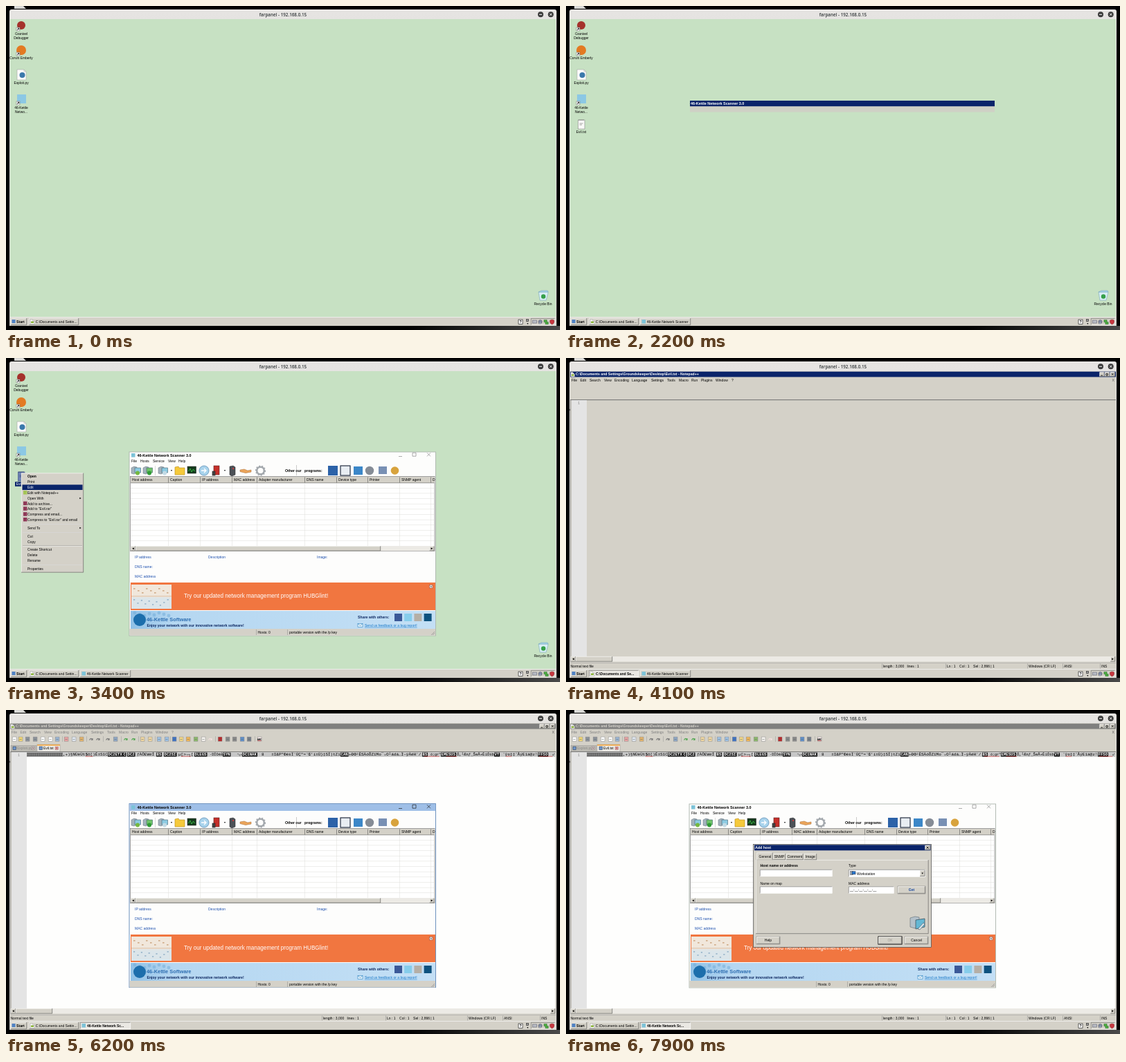
An HTML page that plays this animation: 800 px wide and 469 px high, repeating every 8 s.

```html
<!DOCTYPE html>
<html lang="en">
<head>
<meta charset="utf-8">
<title>Remote desktop session</title>
<style>
html, body { margin: 0; width: 100%; height: 100%; overflow: hidden; background: #000; }
svg { display: block; width: 100vw; height: 100vh; }
text { font-family: "Liberation Sans", Arial, sans-serif; white-space: pre; }
.mono { font-family: "Liberation Mono", "DejaVu Sans Mono", monospace; }
.head { font-family: "Open Sans", "Noto Sans", sans-serif; }
</style>
</head>
<body>
<svg id="stage" viewBox="0 0 800 469" preserveAspectRatio="none"></svg>
<script>
const LOOP = 8000;
const FACE = '#d4d1c8', NAVY = '#0a246a', DESK = '#c7e1c3', LINK = '#1c4fae';
const APP = '46-Kettle Network Scanner';
const FILE = 'C:\\Documents and Settings\\Groundskeeper\\Desktop\\Evil.txt';

// Drawing helpers: each returns an SVG string.
const esc = s => s.replace(/&/g, '&amp;').replace(/</g, '&lt;');
const rect = (x, y, w, h, fill, more = '') =>
  `<rect x="${x}" y="${y}" width="${w}" height="${h}" fill="${fill}" ${more}/>`;
const box = (x, y, w, h, fill, line, sw = 0.6) =>
  rect(x, y, w, h, fill, `stroke="${line}" stroke-width="${sw}"`);
const disc = (x, y, r, fill, more = '') => `<circle cx="${x}" cy="${y}" r="${r}" fill="${fill}" ${more}/>`;
const path = (d, stroke, sw = 0.6, fill = 'none', more = '') =>
  `<path d="${d}" fill="${fill}" stroke="${stroke}" stroke-width="${sw}" ${more}/>`;
const text = (x, y, s, { size = 5, fill = '#000', bold, mid, cls = '', more = '' } = {}) =>
  `<text x="${x}" y="${y}" font-size="${size}" fill="${fill}" class="${cls}"` +
  `${bold ? ' font-weight="700"' : ''}${mid ? ' text-anchor="middle"' : ''} ${more}>${esc(s)}</text>`;
const each = (list, fn) => list.map(fn).join('');
const range = n => [...Array(n).keys()];

function bevel(x, y, w, h, fill = FACE, sunken = false) {
  const [a, b] = sunken ? ['#666', '#fff'] : ['#fff', '#555'];
  return rect(x, y, w, h, fill) +
    path(`M${x + .3} ${y + h}V${y + .3}H${x + w}`, a) +
    path(`M${x} ${y + h - .3}H${x + w - .3}V${y}`, b);
}
const tri = (x, y, dx, dy) =>
  `<path d="M${x + dx} ${y + dy}L${x - dx + dy} ${y - dy + dx}L${x - dx - dy} ${y - dy - dx}z"/>`;

function scrollBar(x, y, w, h, thumb) {
  return rect(x, y, w, h, '#eceae5') +
    bevel(x, y, 7, h) + tri(x + 3.5, y + h / 2, -1.4, 0) +
    bevel(x + 7, y, thumb, h) +
    bevel(x + w - 7, y, 7, h) + tri(x + w - 3.5, y + h / 2, 1.4, 0);
}

function captionButtons(x, y) {
  return each(range(3), i => bevel(x + i * 7.6, y, 7, 6.4)) +
    path(`M${x + 1.6} ${y + 4.8}h3M${x + 9.3} ${y + 2.3}h2.6v2.4h-2.6zM${x + 17.2} ${y + 1.6}l3 3m0-3l-3 3`, '#000', .8);
}

// Desktop
const shortcut = (x, y) => box(x, y, 5, 5, '#fff', '#555', .4) +
  path(`M${x + 1} ${y + 4}L${x + 3.6} ${y + 1.4}M${x + 1.6} ${y + 1.2}h2.2v2.2`, '#000', .8);
const label = (x, y, ...lines) => each(lines, (s, i) => text(x, y + i * 6, s, { mid: true, size: 4.9 }));

function page(x, y, w, h) {
  return path(`M${x} ${y}h${w - 3}l3 3v${h - 3}h${-w}z`, '#999', .5, '#fcfcfa') +
    path(`M${x + w - 3} ${y}v3h3`, '#999', .5);
}

function desktop(s) {
  let out = rect(6, 19, 788, 432, DESK) +
    disc(22, 28, 6, '#a5322c') + shortcut(15, 31) + label(22, 42, 'Granivel', 'Debugger') +
    disc(22, 64, 7, '#e37a22') + shortcut(15, 67) + label(22, 77.4, 'Corvin Emberly') +
    page(16, 92, 13, 15) + disc(23.5, 100, 4, '#3b78ab') + label(22, 113, 'Exploit.py') +
    rect(16, 128, 13, 13, '#8cc8e4') + shortcut(15, 138) + label(22, 148.6, '46-Kettle', 'Netwo...') +
    path('M769 414l2 12h9l3-12z', '#7aa9bd', .6, '#d9eef4') +
    path('M769 414l4-2h9l1 2z', '#7aa9bd', .6, '#a8d7ea') + disc(776, 420.5, 3.2, '#35a04a') +
    label(775.5, 433.2, 'Recycle Bin');
  if (s.evil) {
    out += box(17.5, 165, 9.5, 13, s.sel ? '#6f83b5' : '#fafaf8', s.sel ? '#34487d' : '#888') +
      path('M19 164v2m2-2v2m2-2v2m2-2v2M19.5 170h5m-5 2h3.5', s.sel ? '#26386b' : '#666', .6);
    out += s.sel
      ? rect(13, 179.2, 18, 6.6, NAVY) + text(22, 184, 'Evil.txt', { mid: true, fill: '#fff' })
      : label(22, 184, 'Evil.txt');
  }
  return out;
}

function taskButton(x, w, on, icon, name, short) {
  return bevel(x, 452, w, 10, on ? '#eae8e3' : FACE, on) + icon +
    text(x + (on ? 10 : 9.8), 458.8, on ? short : name, { bold: on, size: on ? 4.95 : 5 });
}

function taskbar(s) {
  const top = s.active === 'dialog' ? 'scanner' : s.active;
  let out = rect(6, 450, 788, 13, FACE) + rect(6, 450.4, 788, .6, '#fff') +
    bevel(7, 452, 23, 10) + rect(8.5, 454, 5, 5, '#4f82c4') + text(15, 458.9, 'Start', { bold: true, size: 5.2 }) +
    taskButton(33, 72, top === 'editor', page(35, 453.5, 6, 7) + rect(36, 456.5, 4, 2.5, '#8db63c'),
      'C:\\Documents and Settin...', 'C:\\Documents and Se...');
  if (s.task) out += taskButton(107, 73, top === 'scanner', rect(109.5, 454, 5.5, 5.5, '#7cc3d8'),
    APP, '46-Kettle Network Sc...');
  return out + bevel(758, 452, 35, 10, FACE, true) +
    box(740, 454, 6, 6.5, '#fff', '#000') + text(743, 459.4, '?', { mid: true, bold: true }) +
    box(751.6, 453.5, 3, 3, '#999', '#222') + tri(753.3, 460, 0, 1) +
    box(760.5, 455, 6, 4, '#b8bcc4', '#667') + disc(771.5, 457, 2.6, '#8490a8', 'stroke="#445" stroke-width=".5"') +
    box(769.8, 458, 3, 2, '#b6c3d6', '#556', .4) +
    box(777, 454.5, 4, 3.2, '#55bb48', '#276c25') + box(779, 457.5, 4, 3.2, '#55bb48', '#276c25') +
    path('M785.5 455l3-1 3 1v3q-1 2-3 3-2-1-3-3z', '#8c1f25', .5, '#c73740');
}

// Text editor
const MENU = [[8, 'File'], [20.5, 'Edit'], [34, 'Search'], [55, 'View'], [70, 'Encoding'], [95, 'Language'],
  [123, 'Settings'], [146, 'Tools'], [163, 'Macro'], [181, 'Run'], [195, 'Plugins'], [216, 'Window'], [239, '?']];
const TOOLS = [12, 21, 31, 42, 53, 64, 74, 87, 98, 109, 123, 133, 147, 158, 173, 184, 197, 208, 221, 232,
  243, 253, 263, 274, 285, 295, 309, 320, 330, 341, 351, 366];
const TINTS = '#fff #f1d572 #8d939b #8d939b #fff #fff #9ab5d4 #e8a2a2 #dfe6ef #e3b36b #777 #777 #777 #8fa7c4 #4ba54b #4ba54b #f0d6a0 #f0d6a0 #9ec1e4 #9ec1e4 #3f73c4 #f3d784 #f1b657 #8cb86a #f5f2ee #f5e0e0 #b92727 #888 #888 #5f8fc9 #777f8a #f4e8e8'.split(' ');
const THIN = new Set([10, 11, 12, 14, 15, 25]);

// Control-code tags sit at fixed places; plain runs fill the gaps.
const RUNS = [[82, ',+)§NÙèÙt$ô[)É±S1C'], [189, 'ƒÀÕEWéÍ'], [249, 'µ[>→┐['], [294, '·DÎOéå'], [334, '"çT'],
  [369, '8   ±I&P"ΦéśÏ¨ÚÇ"=¨Œ\'í±Ù}‡SÎ)tZï'], [495, '+ÐΦ²ÈSÀóÔZîMo¯›O¹ádá…Ï–ÿÀéH¨/'], [613, 'ó;gr"'],
  [651, 'Ó,¹Ænƒ_ŠeÅ+ÈíÓśb'], [717, '¨ŷ¤‡‡¨ÅýEîá@z!'], [789, 'ä"']];
const TAGS = [[147, 'DC2ETX'], [169, 'C'], [175, 'DC2'], [217, 'BS'], [228, 'DC2SI'], [272, 'DLEGS'], [313, 'SYN'],
  [341, 'DC1NAK'], [483, 'CAN'], [601, 'BS'], [628, 'EMESUS'], [705, 'VT'], [768, 'FFSO']];

function firstLine() {
  return rect(30, 61.2, 763, 6.6, '#c6c6c6') + rect(30, 61.8, 52, 5.4, '#555') +
    path('M30 64.5H82', '#999', 4, 'none', 'stroke-dasharray=".7 .9"') +
    each(RUNS, ([x, s]) => {
      const end = TAGS.map(t => t[0]).find(v => v > x) || 793;
      return text(x, 66.4, s, { cls: 'mono', size: Math.min(6, (end - x) / s.length / .6) });
    }) +
    each(TAGS, ([x, s]) => rect(x, 61.6, s.length * 3.5 + 1, 5.8, '#111') +
      text(x + .6, 66.2, s, { cls: 'mono', size: 5.6, fill: '#fff', bold: true })) +
    path('M115 67.2h10M253 67.2h14M604 67.2h22M636 67.2h15M722 67.2h8M770 67.2h19', '#d22', .8, 'none',
      'stroke-dasharray="1.2 .6"');
}

function tab(x, w, name, on) {
  return rect(x, on ? 50 : 51.5, w, on ? 10 : 8.5, on ? '#eeece7' : '#bdbbb4', 'stroke="#888" stroke-width=".4"') +
    (on ? rect(x, 50, w, 1.6, '#f2a33c') : '') + box(x + 3, 53, 4.5, 4.5, '#6f95c9', '#345') +
    text(x + 9, 57, name, { fill: on ? '#000' : '#8a8a86' }) +
    box(x + w - 7, 53, 4.6, 4.6, on ? '#e9a0a0' : '#ccc', '#866', .4) +
    path(`M${x + w - 5.8} 54.2l2.2 2.2m0-2.2l-2.2 2.2`, '#622', .5);
}

function editorTools() {
  return each(TOOLS, (x, i) => THIN.has(i)
    ? path(`M${x - 2.5} 43.5q2-4 4.5-.5m0-2v2.3h-2.2`, TINTS[i], 1.1)
    : box(x - 2.8, 39, 5.8, 6.2, TINTS[i], '#8a8a8a', .5) + path(`M${x - 1.5} 42.5h3`, '#566', .5)) +
    each([81, 116, 140, 166, 191, 215, 237, 302, 359], x => rect(x, 38, .5, 8, '#999')) +
    text(366, 43.6, 'ABC', { size: 3, bold: true, mid: true }) + path('M363.5 44.4h5', '#d22', .6);
}

function editor(s) {
  const on = s.active === 'editor', ink = on ? '#000' : '#808080';
  const status = [[458, 'length : 3,000   lines : 1'], [550, 'Ln : 1    Col : 1    Sel : 2,866 | 1'],
    [668, 'Windows (CR LF)'], [719, 'ANSI'], [773, 'INS']];
  return rect(6, 19, 788, 432, FACE) + rect(6, 19.7, 788, 7.8, on ? NAVY : '#7f7f7f') +
    page(7, 20.5, 5.5, 6.4) + rect(8, 23.5, 3.5, 2.4, '#8db63c') +
    text(14, 25.4, FILE + ' - Notepad++', { bold: true, size: 5.15, fill: on ? '#fff' : '#d6d3cc' }) +
    captionButtons(770.5, 20.4) +
    each(MENU, ([x, m]) => text(x, 34.2, m, { fill: ink })) + text(788.5, 34.2, 'X', { fill: '#555' }) +
    rect(6, 60.2, 788, .9, '#666') + rect(8, 61, 22, 371, '#e4e4e4') + rect(6.4, 61, .7, 379, '#777') +
    (s.editor === 'full'
      ? rect(30, 61, 763, 371, '#fefefd') + editorTools() +
        tab(7, 37, 'Exploit.py', false) + tab(45, 33, 'Evil.txt', true) + firstLine()
      : '') +
    text(17, 66.5, '1', { fill: '#888', cls: 'mono' }) +
    scrollBar(7, 432, 786, 7.5, 53) +
    rect(6, 441, 788, 9.4, FACE) + rect(6, 441, 788, .5, '#999') + text(6.5, 447.8, 'Normal text file') +
    each(status, ([x, v]) => rect(x - 2, 442.5, .5, 7, '#888') + text(x, 447.8, v));
}

// Scanner
const COLS = [[182, 'Host address'], [237, 'Caption'], [283, 'IP address'], [329, 'MAC address'],
  [365, 'Adapter manufacturer'], [434, 'DNS name'], [480, 'Device type'], [525, 'Printer'], [571, 'SNMP agent'], [616, 'D']];

const pc = (x, y, tint, mark) => path(`M${x} ${y + 3}l4-2 4 1v8l-4 2-4-1z`, '#64717c', .5, '#a4b3bd') +
  box(x + 5, y + 3, 8.5, 7, tint, '#47606f') + disc(x + 9, y + 10.5, 3, mark);

function scannerTools() {
  return pc(181, 156, '#8ccbe2', '#74b83f') + pc(198, 156, '#6fc36a', '#2f9c35') + rect(215, 156, .5, 14, '#bbb') +
    pc(220, 156, '#8ccbe2', '#c3dbe6') + tri(239, 163, 0, 1) +
    path('M244 158l5-1 1 2h8v10h-14z', '#b88a17', .6, '#f5c93b') +
    box(262, 157, 12.5, 10, '#143a1c', '#333') + path('M263.5 164l2.5-4 2 5 2.5-4 2 3', '#3fd14a', .8) +
    disc(286, 163, 7, '#a9d3ec', 'stroke="#5c8fb5" stroke-width=".8"') + path('M282 163h7m-3-3l3 3-3 3', '#fff', 1.3) +
    box(300, 156, 8, 13, '#c52f2a', '#57201d') + box(298, 164, 4, 6, '#444', '#222') + tri(316, 163, 0, 1) +
    path('M323 157l5-1 3 2v11l-5 2-3-2z', '#222', .5, '#4c5157') + disc(328, 160, 1, '#e33') +
    path('M338 162l6-1 5 2 5-1v3l-8 1.5-8-2z', '#a4672c', .5, '#eba55b') +
    disc(367.5, 163, 5.3, 'none', 'stroke="#a3a8ad" stroke-width="2.6"') +
    disc(367.5, 163, 6.8, 'none', 'stroke="#a3a8ad" stroke-width="1.6" stroke-dasharray="2 2.2"') +
    text(403, 164.8, 'Other our', { bold: true, size: 5.2 }) + text(431, 164.8, 'programs:', { bold: true, size: 5.2 }) +
    rect(419.4, 155, .5, 15, '#999') +
    rect(465, 156, 14, 14, '#2c62a8') + box(483, 156, 14, 14, '#e8edf2', '#252f42', 1.2) +
    rect(502, 157, 13, 12, '#3c87c8') + disc(525, 163, 6.2, '#858c96') +
    rect(538, 157, 12, 11, '#7890b4') + disc(561.5, 163, 5.8, '#d8a33d');
}

function banner() {
  return rect(180, 325, 440, 40, '#f17640') + rect(181, 328, 58, 35, 'url(#map)') +
    rect(181, 344.5, 58, .8, '#e6b58a') + each(range(9), i => rect(184 + i * 6, 333 + i % 3 * 3, 2.6, 1.8, '#d3b190')) +
    each(range(10), i => rect(184 + i * 5.4, 349 + i * 5 % 9, 2.2, 1.8, '#9db8cc')) +
    text(257, 347.2, 'Try our updated network management program HUBGlint!', { size: 8.15, fill: '#fff' }) +
    box(611.5, 328.5, 4.5, 4.5, '#f7f2ee', '#733', .4) + path('M612.5 329.5l2.5 2.5m0-2.5l-2.5 2.5', '#333', .6);
}

function footer() {
  const share = ['#3b5998', '#86cdeb', '#b5afa6', '#0d527f'];
  return rect(180, 366, 440, 26, 'url(#sky)') +
    each(range(8), i => disc(186 + i * 7, 369 + i * 7 % 5, 2.4, '#6ea9d8', 'opacity=".5"')) +
    disc(193, 379, 9, '#1c6eac') +
    text(203, 381.4, '46-Kettle Software', { size: 7.4, bold: true, fill: '#2c6db0' }) +
    text(203.5, 388.8, 'Enjoy your network with our innovative network software!', { size: 5.1, bold: true, fill: '#0d2760' }) +
    text(508, 377.2, 'Share with others:', { size: 5.2, bold: true, fill: '#0d2760' }) +
    each(share, (c, i) => rect(561 + i * 14.2, 370, 11, 11, c)) +
    box(508, 384.5, 7, 5, '#e6f3fb', '#2b82bf') + path('M508 384.5l3.5 3 3.5-3', '#2b82bf') +
    text(518, 388.8, 'Send us feedback or a bug report!', { fill: '#1b79c7', more: 'text-decoration="underline"' });
}

function scanner(s) {
  if (s.scanner === 'paint') return rect(179, 145, 440, 8.5, '#cfd0c5') + rect(179, 137, 440, 8.2, NAVY) +
    text(180, 143.2, APP + ' 3.0', { bold: true, size: 5.4, fill: '#fff' });
  const on = s.active === 'scanner';
  return box(178, on ? 135.6 : 136, 442.5, 266, '#fdfdfc', on ? '#5d86b8' : '#aab4ac', .9) +
    (on ? rect(178.4, 136, 441.8, 10, '#9fbfe7') : '') +
    rect(181, 138, 5.5, 5.5, '#7cc3d8') + text(189.5, 142.8, APP + ' 3.0', { bold: true, size: 5.45 }) +
    path('M567 142.5h5M587 137.2h5v5h-5zM608 137.3l5 5m0-5l-5 5', on ? '#222' : '#888', .7) +
    each([[181, 'File'], [194, 'Hosts'], [212, 'Service'], [234, 'View'], [249, 'Help']], ([x, m]) => text(x, 151.4, m)) +
    scannerTools() +
    rect(179.4, 171.6, 439.6, 108, '#fff', 'stroke="#777" stroke-width=".7"') + rect(180, 172, 438.6, 9, FACE) +
    rect(180, 180.5, 438.6, .7, '#777') +
    each(COLS, ([x, name], i) => text(x, 178, name) +
      (i ? rect(x - 2.6, 172.5, .6, 8, '#555') + rect(x - 2.6, 181, .5, 91, '#dcdcd8') : '')) +
    each(range(12), i => rect(180, 188 + i * 7.65, 438, .5, '#dcdcd8')) +
    scrollBar(180, 272.3, 438.5, 7, 354) +
    each([[186, 290, 'IP address'], [292, 290, 'Description'], [449, 290, 'Image:'], [186, 304, 'DNS name:'], [186, 318, 'MAC address']],
      ([x, y, v]) => text(x, y, v, { fill: LINK })) +
    banner() + footer() +
    rect(178.5, 392, 441.5, 9.6, FACE) + rect(361, 393, .5, 8, '#888') + rect(406.5, 393, .5, 8, '#888') +
    text(363.5, 398.6, 'Hosts: 0') + text(409, 398.6, 'portable version with the /p key') +
    path('M614 401l5-5m-3 5l3-3', '#888');
}

// Add host dialog
const field = (x, y, w, h) => bevel(x, y, w, h, '#fff', true);

function button(x, y, w, name, { fill = '#000', bold, line = '#555', sw = .4 } = {}) {
  return box(x, y, w, 11, FACE, line, sw) + bevel(x + .4, y + .4, w - .8, 10.2) +
    text(x + w / 2, y + 7.3, name, { mid: true, fill, bold });
}

function dialog() {
  return box(270.4, 194.4, 257.2, 149.2, FACE, '#333') + rect(272, 195.3, 254.5, 8, NAVY) +
    text(273, 201, 'Add host', { bold: true, size: 5.3, fill: '#fff' }) +
    bevel(518.5, 196, 7.5, 6.4) + path('M520.6 197.6l3.2 3.2m0-3.2l-3.2 3.2', '#000', .9) +
    bevel(274, 217, 249.5, 107) +
    each([[299, 18, 'SNMP'], [318, 24.5, 'Comment'], [343.5, 18.5, 'Image']],
      ([x, w, v]) => bevel(x, 208, w, 9) + text(x + w / 2, 214.3, v, { mid: true })) +
    bevel(275.5, 206.5, 23, 11) + rect(276, 216.5, 22, 1.4, FACE) + text(278.5, 213.6, 'General') +
    text(280.5, 227.4, 'Host name or address', { bold: true, size: 5.2 }) + field(280, 231, 104.5, 10) +
    text(280.5, 252.6, 'Name on map') + field(280, 255.5, 104.5, 10) +
    text(408, 227.4, 'Type') + field(408, 231, 111, 10.5) +
    box(410.5, 233.4, 4, 5, '#a4b3bd', '#556') + box(413, 233.8, 5, 4, '#2878d4', '#234') + text(420, 238.6, 'Workstation') +
    bevel(511, 232, 7.3, 8.7) + tri(514.7, 236.6, 0, 1.2) +
    text(408, 252.6, 'MAC address') + field(408, 255.5, 65.5, 10) + text(410, 262.2, '__-__-__-__-__-__', { size: 4.6 }) +
    button(479, 255, 40, 'Get', { fill: '#1848a0', bold: true }) +
    path('M497 301l7-2 6 1v13l-6 3-7-2z', '#5d6a74', .6, '#b4c1ca') +
    path('M505 304l13-2v12l-13 3z', '#41525e', .8, '#63b7d4') + path('M508 317l8-9 2 2-7 8z', '#456', .6, '#d6e4ea') +
    button(275, 328, 34, 'Help') + button(451, 328, 34, 'OK', { fill: '#9a9790', line: '#000', sw: 1.1 }) +
    button(489, 328, 34, 'Cancel');
}

// Shell menu: label, baseline, icon colour, has submenu
const ITEMS = [['Open', 173.2], ['Print', 181.2], ['Edit', 189], ['Edit with Notepad++', 197, '#a4c455'], ['Open With', 204.8, '', 1],
  ['Add to archive...', 212.6, '#8f3a58'], ['Add to "Evil.rar"', 220.3, '#8f3a58'], ['Compress and email...', 228.2, '#8f3a58'],
  ['Compress to "Evil.rar" and email', 236, '#8f3a58'], ['Send To', 247.8, '', 1], ['Cut', 260], ['Copy', 267.6],
  ['Create Shortcut', 279.4], ['Delete', 287], ['Rename', 294.8], ['Properties', 306.8]];

function shellMenu(hover) {
  return bevel(22, 166.5, 90, 144) +
    each([240, 252, 271.6, 299], y => rect(24, y, 86, .5, '#888') + rect(24, y + .5, 86, .5, '#fff')) +
    each(ITEMS, ([name, y, icon, sub]) => {
      const on = name === hover;
      return (on ? rect(23.5, y - 5.6, 87, 7.6, NAVY) : '') + (icon ? rect(25, y - 5, 5.5, 5.5, icon) : '') +
        text(31, y, name, { fill: on ? '#fff' : '#000', bold: name === 'Open' }) + (sub ? tri(107.5, y - 1.8, 1.2, 0) : '');
    });
}

const DEFS = `<defs>
  <linearGradient id="sky"><stop offset="0" stop-color="#8fc0e6"/><stop offset=".14" stop-color="#b5d7f1"/><stop offset="1" stop-color="#c3dff5"/></linearGradient>
  <linearGradient id="map" x2="0" y2="1"><stop offset=".4" stop-color="#f1e7db"/><stop offset=".6" stop-color="#dbe5ea"/></linearGradient>
  <linearGradient id="bar" x2="0" y2="1"><stop offset="0" stop-color="#e6e4e2"/><stop offset="1" stop-color="#d3d0cd"/></linearGradient>
  <linearGradient id="dusk"><stop offset="0" stop-color="#000"/><stop offset="1" stop-color="#4a4a4a"/></linearGradient></defs>`;

function frame() {
  return DEFS + rect(0, 0, 800, 469, '#000') + rect(580, 463, 220, 6, 'url(#dusk)') +
    path('M12 4V0h13l4 4z', 'none', 0, '#d8d8d6') +
    `<path d="M5 463V8q0-3 3-3h784q3 0 3 3v455z" fill="url(#bar)"/>` +
    text(400, 14.7, 'farpanel - 192.168.0.15', { size: 6.3, mid: true, cls: 'head', fill: '#33383a', more: 'font-weight="600"' }) +
    disc(772, 12.3, 4, '#3c3c3c') + disc(786.7, 12.3, 4, '#3c3c3c') +
    path('M770 12.3h4M785.2 10.8l3 3m0-3l-3 3', '#fff', 1);
}

function scene(s) {
  return frame() + desktop(s) +
    (s.editor ? editor(s) : '') +
    (s.scanner && s.active !== 'editor' ? scanner(s) : '') +
    (s.menu ? shellMenu(s.menu) : '') + (s.dialog ? dialog() : '') + taskbar(s);
}

// Each step changes part of the state from its time on.
const STEPS = [
  [0, {}],
  [1000, { evil: true }],
  [2100, { task: true }],
  [2200, { scanner: 'paint' }],
  [2300, { scanner: 'full', active: 'scanner' }],
  [3000, { sel: true, active: null }],
  [3100, { menu: 'none' }],
  [3200, { menu: 'Open' }],
  [3400, { menu: 'Edit' }],
  [3500, { menu: null }],
  [4100, { editor: 'paint', active: 'editor' }],
  [4200, { editor: 'full' }],
  [5900, { active: 'scanner' }],
  [7000, { dialog: true, active: 'dialog' }]
];

const stage = document.getElementById('stage');
const start = performance.now();
let shown = -1;

function tick() {
  const t = (performance.now() - start) % LOOP;
  const count = STEPS.filter(([at]) => at <= t).length;
  if (count !== shown) {
    shown = count;
    stage.innerHTML = scene(Object.assign({}, ...STEPS.slice(0, count).map(step => step[1])));
  }
  requestAnimationFrame(tick);
}
tick();
</script>
</body>
</html>
```
